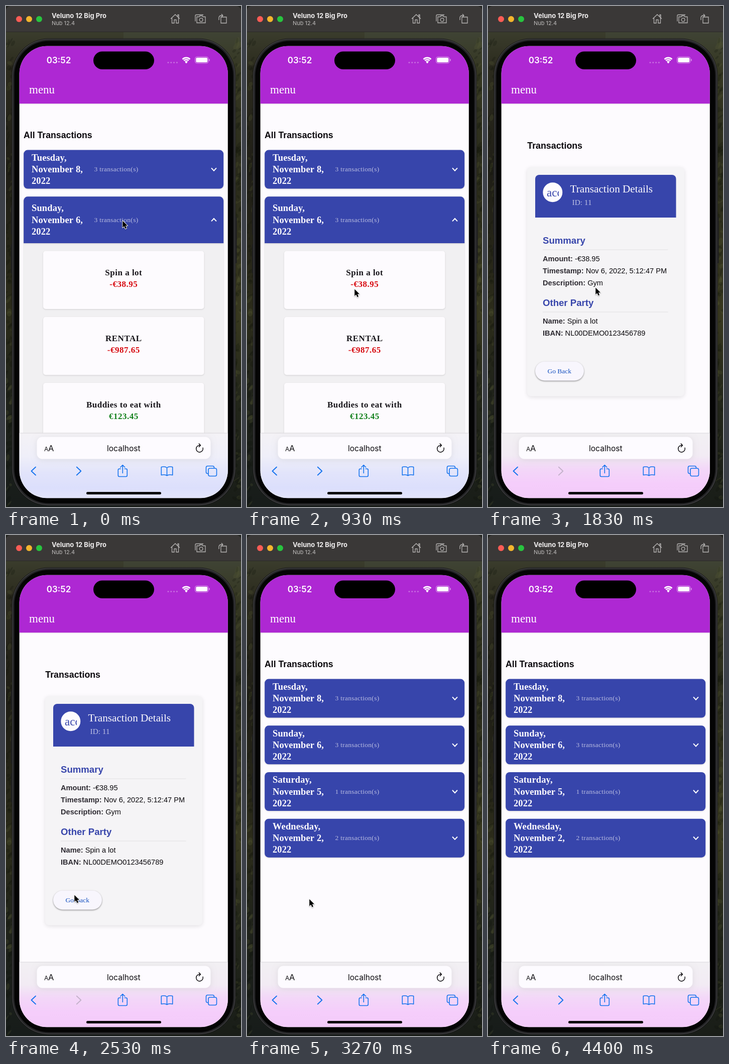
Recreate the animation shown at these times as an HTML page with a canvas. Size 468x997 px, loop 4.43 s.

```html
<!DOCTYPE html>
<html lang="en">
<head>
<meta charset="utf-8">
<title>Transactions demo</title>
<style>
html, body { margin: 0; width: 100%; height: 100%; overflow: hidden; background: #191b14; }
canvas { display: block; width: 468px; height: 997px; }
</style>
</head>
<body>
<canvas id="stage"></canvas>
<script>
const W = 468, H = 997, LOOP = 4430;
const OPEN_DETAIL = 1250, PRESS = 2830, GO_BACK = 3120;
const BLUE = '#3745ab', PAPER = '#fdfbfe', LINK = '#1473ee';
const SERIF = '"Liberation Serif", serif', SANS = '"Liberation Sans", sans-serif', UI = 'Inter, sans-serif';

const canvas = document.getElementById('stage');
const ratio = window.devicePixelRatio || 1;
canvas.width = W * ratio;
canvas.height = H * ratio;
let c = canvas.getContext('2d');

function box(x, y, w, h, r, fill) {
  c.beginPath();
  c.roundRect(x, y, w, h, r);
  if (fill) { c.fillStyle = fill; c.fill(); }
}

function shadowBox(x, y, w, h, r, fill, blur, dy, alpha) {
  c.save();
  c.shadowColor = `rgba(0,0,0,${alpha})`;
  c.shadowBlur = blur * ratio;
  c.shadowOffsetY = dy * ratio;
  box(x, y, w, h, r, fill);
  c.restore();
}

function text(str, x, y, font, fill, align = 'left', spacing = 0) {
  c.font = font;
  c.fillStyle = fill;
  c.textAlign = align;
  c.letterSpacing = spacing + 'px';
  c.fillText(str, x, y);
  return c.measureText(str).width;
}

function line(points, color, width) {
  c.beginPath();
  points.forEach(([x, y], i) => i ? c.lineTo(x, y) : c.moveTo(x, y));
  c.strokeStyle = color;
  c.lineWidth = width;
  c.stroke();
}

function dot(x, y, r, fill) {
  c.beginPath();
  c.arc(x, y, r, 0, Math.PI * 2);
  c.fillStyle = fill;
  c.fill();
}

function strokePath(d, color, width, x = 0, y = 0) {
  c.save();
  c.translate(x, y);
  c.strokeStyle = color;
  c.lineWidth = width;
  c.stroke(new Path2D(d));
  c.restore();
}

function gradient(y0, y1, colors) {
  const g = c.createLinearGradient(0, y0, 0, y1);
  colors.forEach(([at, color]) => g.addColorStop(at, color));
  return g;
}

function drawForest() {
  const leftTones = [[0, '#3a3c2c'], [.08, '#2b2a1d'], [.3, '#1f1e16'], [.6, '#2c2c1a'], [.75, '#20231a'], [1, '#171c1a']];
  const rightTones = [[0, '#3f4334'], [.08, '#353722'], [.3, '#2a2b1b'], [.6, '#38381f'], [.75, '#24271a'], [1, '#191d18']];
  c.fillStyle = gradient(52, H, leftTones);
  c.fillRect(0, 52, W / 2, H);
  c.fillStyle = gradient(52, H, rightTones);
  c.fillRect(W / 2, 52, W / 2, H);
  let seed = 41;
  const rnd = () => (seed = (seed * 16807) % 2147483647) / 2147483647;
  c.globalAlpha = .22;
  for (let i = 0; i < 260; i++) {
    c.fillStyle = rnd() < .6 ? '#0c100b' : '#5d5f38';
    c.beginPath();
    c.ellipse((rnd() < .5 ? 0 : 454) + rnd() * 14, 52 + rnd() * 945, 1 + rnd() * 4, 2 + rnd() * 7, rnd(), 0, 7);
    c.fill();
  }
  c.globalAlpha = 1;
}

function drawTitleBar() {
  c.fillStyle = '#20221d';
  c.fillRect(0, 0, W, 10);
  box(0, 0, W, 52, [9, 9, 0, 0], '#3a3837');
  c.fillStyle = '#2a2928';
  c.fillRect(0, 51, W, 1);
  ['#fb5c55', '#f5b52d', '#28c43f'].forEach((color, i) => dot(26 + 20 * i, 26, 6, color));
  text('Veluno 12 Big Pro', 91, 24, `700 13px ${UI}`, '#f1efef');
  text('Nub 12.4', 91, 38, `400 11px ${UI}`, '#bdbbba');
  const gray = '#b5b3b2';
  strokePath('M-9 0L0 -8.5L9 0M-6.5 -2V8.5H-2V2H2V8.5H6.5V-2M5 -4V-8H7V-2', gray, 1.3, 337, 25.5);
  strokePath('M-10 5V-6Q-10 -8 -8 -8H6', gray, 1.3, 387, 25.5);
  strokePath('M-7 -4H-2L-1 -6H4L5 -4H10V8H-7ZM5 2A3.4 3.4 0 1 1 -1.8 2A3.4 3.4 0 1 1 5 2', gray, 1.3, 387, 25.5);
  strokePath('M-4 -4H7V8H-4ZM-8 2V-2Q-8 -7 -3 -7H0M-3 -10L0 -7L-3 -4', gray, 1.3, 432, 26);
}

function drawPhone() {
  for (const [x, y, h] of [[10, 310, 37], [10, 397, 58], [10, 474, 58], [456.5, 420, 92]])
    box(x, y, 3, h, 1, '#202022');
  box(11.5, 64.5, 446, 930, 74, '#141415');
  box(12.5, 65.5, 444, 928, 73, '#4b4b4c');
  box(13.5, 66.5, 442, 926, 72, '#232325');
  box(16.5, 69.5, 436, 920, 69, '#040404');
}

function drawHeader() {
  shadowBox(26, 70, 417, 124.3, 0, '#ae28d3', 3, .6, .14);
  text('03:52', 105, 113.8, `600 17px ${UI}`, '#fff', 'center');
  box(174, 90.5, 121, 35.5, 17.75, '#000');
  for (let i = 0; i < 4; i++) dot(323 + 5.8 * i, 112.5, 1.6, 'rgba(255,255,255,.3)');
  for (const r of [3, 6.8, 10.6]) {
    c.beginPath();
    c.arc(359, 113.5, r, -Math.PI * .75, -Math.PI * .25);
    c.strokeStyle = '#fff';
    c.lineWidth = 2.6;
    c.stroke();
  }
  dot(359, 112.3, 1.6, '#fff');
  box(376.5, 101, 26.5, 13, 4);
  c.strokeStyle = 'rgba(255,255,255,.5)';
  c.lineWidth = 1;
  c.stroke();
  box(378.3, 102.8, 23, 9.4, 2.5, '#fff');
  box(404.2, 105.2, 1.5, 4.6, 1, 'rgba(255,255,255,.55)');
  text('menu', 46, 173.6, `23px ${SERIF}`, '#fff');
}

function drawRow(y, day, date, count, expanded) {
  const h = expanded ? 92.7 : 77;
  const mid = y + h / 2;
  shadowBox(35.2, y, 398, h, expanded ? [8, 8, 0, 0] : 8, BLUE, 3, 1, .15);
  [day, date, '2022'].forEach((part, i) =>
    text(part, 51, mid - 17.2 + 23.2 * i, `700 18.5px ${SERIF}`, PAPER, 'left', .12));
  text(`${count} transaction(s)`, 175.5, mid + 4, `13.5px ${SERIF}`, '#b9bde1', 'left', .27);
  const bend = expanded ? -2.7 : 2.7;
  line([[409, mid - bend], [414, mid + bend], [419, mid - bend]], '#fff', 2);
}

function drawList(expanded) {
  text('All Transactions', 35, 262.5, `700 17.7px ${SANS}`, '#0b090d');
  if (!expanded) {
    const rows = [['Tuesday,', 'November 8,', 3], ['Sunday,', 'November 6,', 3],
      ['Saturday,', 'November 5,', 1], ['Wednesday,', 'November 2,', 2]];
    rows.forEach((row, i) => drawRow(286.6 + 92.7 * i, ...row, false));
    return;
  }
  drawRow(286.6, 'Tuesday,', 'November 8,', 3, false);
  shadowBox(35.2, 379.3, 398, 520, 8, '#f1f0f2', 3, 1, .15);
  drawRow(379.3, 'Sunday,', 'November 6,', 3, true);
  const red = '#d7080e';
  [['Spin a lot', '-€38.95', red], ['RENTAL', '-€987.65', red], ['Buddies to eat with', '€123.45', '#10801a']]
    .forEach(([name, amount, color], i) => {
      const y = 487.5 + 131.3 * i;
      shadowBox(74, y, 320.5, 115.5, 5, PAPER, 3, 1, .14);
      text(name, 234.3, y + 48.5, `700 17px ${SERIF}`, '#17151a', 'center', .5);
      text(amount, 234.3, y + 71.5, `700 17px ${SERIF}`, color, 'center', .5);
    });
}

function drawField(label, value, y) {
  const w = text(label + ' ', 109, y, `700 14.6px ${SANS}`, '#2e2b32');
  text(value, 109 + w, y, `14.6px ${SANS}`, '#0b090d');
}

function drawDetail(press) {
  text('Transactions', 78.3, 284, `700 17.8px ${SANS}`, '#0b090d');
  shadowBox(78, 321, 313, 455.5, 8, '#f5f4f6', 9, 2, .11);
  box(94, 336, 280.5, 85, [8, 8, 0, 0], BLUE);
  dot(128.8, 370.8, 19.5, PAPER);
  c.save();
  c.beginPath();
  c.rect(117, 351, 24, 40);
  c.clip();
  text('account', 117, 378.5, `23px ${SERIF}`, BLUE);
  c.restore();
  text('Transaction Details', 163.5, 371, `21.2px ${SERIF}`, PAPER);
  text('ID: 11', 167.5, 395.5, `15.4px ${SERIF}`, '#bcc0e3');
  [['Summary', 473], ['Other Party', 597]].forEach(([title, y]) => {
    text(title, 109, y, `700 18.6px ${SANS}`, BLUE);
    c.fillStyle = '#e2e1e4';
    c.fillRect(109, y + 11.5, 249.5, 1);
  });
  drawField('Amount:', '-€38.95', 508);
  drawField('Timestamp:', 'Nov 6, 2022, 5:12:47 PM', 532);
  drawField('Description:', 'Gym', 556);
  drawField('Name:', 'Spin a lot', 632);
  drawField('IBAN:', 'NL00DEMO0123456789', 656);

  shadowBox(94, 707.5, 97, 38, 19, '#f8f6fd', 3 + 4 * press, 1.2 + 1.3 * press, .42);
  if (press > 0) box(94, 707.5, 97, 38, 19, `rgba(55,69,171,${.13 * press})`);
  text('Go Back', 142.2, 731, `13.5px ${SERIF}`, '#1550c0', 'center');
}

function drawToolbar(blueTint, forward) {
  c.fillStyle = blueTint
    ? gradient(850, 979, [[0, '#f4f2f6'], [.36, '#efeff9'], [.62, '#e2e4fb'], [.85, '#dcdffc'], [1, '#e3e4fb']])
    : gradient(850, 979, [[0, '#f2f0f3'], [.35, '#f2ebf4'], [.55, '#f3d7f8'], [.78, '#f5cdfb'], [1, '#f3cbf9']]);
  c.fillRect(26, 850, 417, 129.5);
  c.fillStyle = '#dad8dc';
  c.fillRect(26, 849.5, 417, 1);
  shadowBox(61.5, 857.5, 346, 44, 11, '#fdfbff', 12, 2, .08);
  text('A', 76, 886, `12px ${UI}`, '#0d0b0f');
  text('A', 84, 886, `16.5px ${UI}`, '#0d0b0f');
  text('localhost', 234.3, 886, `15.6px ${UI}`, '#0d0b0f', 'center');
  c.lineCap = c.lineJoin = 'round';
  strokePath('M6.6 -1.2A6.8 6.8 0 1 1 0 -6.2H1.6M-1.2 -9.4L2 -6.2L-1.2 -3', '#0d0b0f', 1.5, 385.5, 880.5);
  line([[59, 917.5], [50.5, 925.5], [59, 933.5]], LINK, 1.9);
  line([[140.8, 917.5], [149.3, 925.5], [140.8, 933.5]], forward ? LINK : '#c4b2ca', 1.9);
  strokePath('M-4 -4.5H-6.5Q-9 -4.5 -9 -2V8.5Q-9 11 -6.5 11H6.5Q9 11 9 8.5V-2Q9 -4.5 6.5 -4.5H4M0 4V-11.5M-4.5 -7.5L0 -12L4.5 -7.5', LINK, 1.6, 232.3, 925.5);
  strokePath('M0 -6.5Q-4 -10 -11.2 -8V8Q-4 6 0 9Q4 6 11.2 8V-8Q4 -10 0 -6.5V9', LINK, 1.6, 320.5, 925.5);
  strokePath('M-6 5H-7.5Q-10.5 5 -10.5 2V-7Q-10.5 -10 -7.5 -10H2.5Q5.5 -10 5.5 -7V-5.5M-3 -5.5H7.5Q10.5 -5.5 10.5 -2.5V7Q10.5 10 7.5 10H-3Q-6 10 -6 7V-2.5Q-6 -5.5 -3 -5.5Z', LINK, 1.6, 409, 925.5);
  c.lineCap = 'butt';
  c.lineJoin = 'miter';
  box(160, 967, 149, 5, 2.5, '#060506');
}

// Pointer keys: time, x, y
const pointerKeys = [[0, 232, 427], [120, 232, 427], [700, 214, 563], [1300, 214, 563], [1650, 214, 560],
  [1950, 214, 560], [2450, 136, 716], [2600, 136, 716], [2800, 133, 722], [3220, 133, 722], [3560, -16, 760]];

function pointerAt(t) {
  const i = pointerKeys.findIndex(k => k[0] > t);
  if (i < 0) return null;
  const a = pointerKeys[i - 1], b = pointerKeys[i];
  const u = (t - a[0]) / (b[0] - a[0]);
  const e = u * u * (3 - 2 * u);
  return [a[1] + (b[1] - a[1]) * e, a[2] + (b[2] - a[2]) * e];
}

function drawPointer([x, y]) {
  const arrow = new Path2D('M0 0V13.6L3.1 10.8L5.3 15.8L7.7 14.8L5.6 9.8H9.8Z');
  c.save();
  c.translate(x + .3, y + .5);
  c.shadowColor = 'rgba(0,0,0,.3)';
  c.shadowBlur = 2 * ratio;
  c.shadowOffsetY = ratio;
  c.strokeStyle = '#fff';
  c.lineWidth = 1.8;
  c.lineJoin = 'round';
  c.stroke(arrow);
  c.shadowColor = 'transparent';
  c.fillStyle = '#000';
  c.fill(arrow);
  c.restore();
}

// The still surroundings are painted once.
const backdrop = document.createElement('canvas');
backdrop.width = canvas.width;
backdrop.height = canvas.height;
const screenContext = c;
c = backdrop.getContext('2d');
c.scale(ratio, ratio);
drawForest();
drawTitleBar();
drawPhone();
c = screenContext;
c.scale(ratio, ratio);

function render(t) {
  const detail = t >= OPEN_DETAIL && t < GO_BACK;
  const returned = t >= GO_BACK;
  c.drawImage(backdrop, 0, 0, W, H);
  c.save();
  box(26.6, 79.7, 415.2, 899.6, 55);
  c.clip();
  c.fillStyle = PAPER;
  c.fillRect(26, 79, 417, 901);
  if (detail) drawDetail(Math.max(0, Math.min(1, (t - PRESS) / 120)));
  else drawList(!returned);
  drawHeader();
  drawToolbar(t < OPEN_DETAIL, !detail);
  c.restore();
  const pointer = pointerAt(t);
  if (pointer) drawPointer(pointer);
}

const start = performance.now();
function tick() {
  render((performance.now() - start) % LOOP);
  requestAnimationFrame(tick);
}
tick();
</script>
</body>
</html>
```
